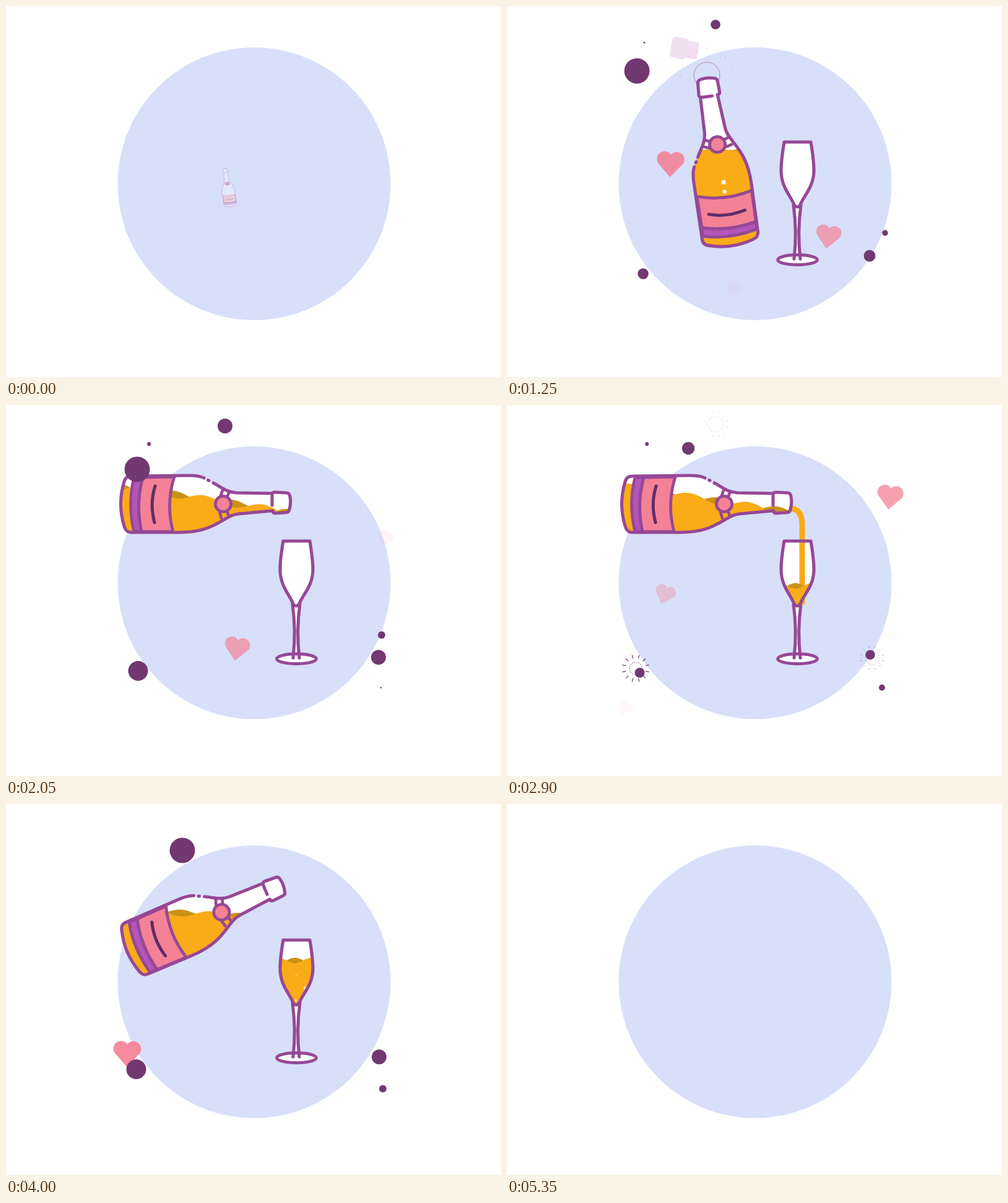
Recreate the animation shown at these times as an HTML page with a canvas. Size 800 px wide and 600 px high, loop 5.4 s.

```html
<!DOCTYPE html>
<html lang="en">
<head>
<meta charset="utf-8">
<title>Pouring champagne</title>
<style>
html, body { margin: 0; width: 100%; height: 100%; overflow: hidden; background: #fff; }
canvas { display: block; }
</style>
</head>
<body>
<canvas width="800" height="600"></canvas>
<script>
const ctx = document.querySelector('canvas').getContext('2d');
const LOOP = 5400, BOTTLE_WAVE = 675, GLASS_WAVE = 1080, TAU = Math.PI * 2;
const LINE = '#964896', PLUM = '#723871', PINK = '#f48296', GOLD = '#f9ab18',
      AMBER = '#ca9118', VIOLET = '#b455b9', INK = '#5f2d69';

const clamp = u => Math.min(1, Math.max(0, u));
const lerp = (a, b, u) => a + (b - a) * u;
const span = (t, from, to) => clamp((t - from) / (to - from));
const inOut = u => u < .5 ? 4 * u ** 3 : 1 - 4 * (1 - u) ** 3;
const smooth = u => u * u * (3 - 2 * u);
const backOut = u => 1 + 2.7 * (u - 1) ** 3 + 1.7 * (u - 1) ** 2;

// The bottle is described lying on its side, neck to the right.
const bottle = new Path2D('M203 206C196 206 193 203 191 196Q180 160 191 124Q193 115 203 115L296 114Q312 114 325 120C340 127 350 140 372 142L431 143Q431 141 434 141L453 142Q458 142 459 148Q461 158 458 169Q457 174 452 174L435 175Q431 175 431 171L376 176C352 178 340 206 280 206Z');
const bottleLine = new Path2D('M320 118Q312 114 296 114L203 115Q193 115 191 124Q180 160 191 196C193 203 196 206 203 206L280 206C340 206 352 178 376 176L431 171Q431 175 435 175L452 174Q457 174 458 169Q461 158 459 148Q458 142 453 142L434 141Q430 141 430 147L430 162M326.500 121.500L328 122.300M335 126C347 132 356 141 372 142L430 143');
const label = new Path2D('M272 116Q258 160 270 205L219 205Q209 160 221 117Z');
const band = new Path2D('M221 117Q209 160 219 205L207 205Q196 160 207 117Z');
const stripe = new Path2D('M241 131Q232 160 240 190');
const collar = new Path2D('M351 136Q340 160 348 183M361 140Q351 160 360 179');
const cup = new Path2D('M448 220L491 220C494 238 496 250 496 266C496 290 483 303 476 317Q473 325 469 325Q465 325 462 317C455 303 443 290 443 266C443 250 445 238 448 220Z');
const stem = new Path2D('M463 322Q469 365 464 409L474 409Q469 365 475 322Z');
const stemLine = new Path2D('M463 322Q469 365 464 409M474 409Q469 365 475 322');
const stream = new Path2D('M456 167Q477 167 477 194L477 322');
const heart = new Path2D('M0 .45L-.42 -.01A.26 .26 0 0 1 0 -.32A.26 .26 0 0 1 .42 -.01Z');

// radius, birth, pop, then the places it drifts through
const dots = [
  [20.5, 250, 2550, 210, 105, 212, 104, 224, 100],
  [12, 650, 2600, 337, 30, 354, 34, 337, 31],
  [3, 750, 3000, 222, 59, 231, 63, 226, 63],
  [16, 720, 2820, 220, 433, 213.5, 430, 208, 426],
  [12, 550, 2650, 586, 404, 602, 408, 590, 409],
  [6, 550, 2540, 611, 367, 607, 372, 619, 368],
  [20.5, 2400, 4980, 293, 70, 285, 75, 291, 71, 296, 71],
  [16, 2400, 5000, 214.5, 433, 210.5, 429, 203.5, 426.5, 222, 429],
  [12, 2300, 4360, 587, 404, 603, 409, 598, 409],
  [6, 1500, 4150, 606, 457, 609, 460.5, 616, 457]
];
// birth, x, y
const hearts = [
  [128, 257, 344], [390, 511, 441], [1190, 365, 462], [1950, 611, 224],
  [2455, 249, 342], [2830, 189, 496], [3210, 229, 257]
];

function disc(x, y, r, color) {
  ctx.fillStyle = color;
  ctx.beginPath();
  ctx.arc(x, y, Math.max(0, r), 0, TAU);
  ctx.fill();
}

function stroke(path, width = 5.1, color = LINE) {
  ctx.lineWidth = width;
  ctx.strokeStyle = color;
  ctx.stroke(path);
}

function fill(path, color) {
  ctx.fillStyle = color;
  ctx.fill(path);
}

function layer(draw) {
  ctx.save();
  draw();
  ctx.restore();
}

function zoom(x, y, s) {
  ctx.translate(x, y);
  ctx.scale(s, s);
  ctx.translate(-x, -y);
}

function liquid(left, right, surface) {
  for (const side of [-1, 1]) {
    ctx.fillStyle = side < 0 ? AMBER : GOLD;
    ctx.beginPath();
    ctx.moveTo(left, 600);
    for (let x = left; x <= right; x += 3) ctx.lineTo(x, surface(x, side));
    ctx.lineTo(right, 600);
    ctx.fill();
  }
}

function drawHeart(t, [birth, x, y]) {
  const u = (t - birth) / 1650;
  if (u <= 0 || u >= 1) return;
  layer(() => {
    const size = 26 + 24 * Math.sin(u * Math.PI / 2);
    ctx.globalAlpha = Math.min(.95, 1.3 * u, (1 - u) * 6.5);
    ctx.translate(x + 8 * Math.sin(u * 3), y - 130 * u);
    ctx.rotate((30 - 40 * u) * Math.PI / 180);
    ctx.scale(size, size);
    fill(heart, PINK);
  });
}

function burst(x, y, r, u) {
  layer(() => {
    ctx.translate(x, y);
    ctx.globalAlpha = clamp(1.9 * (1 - u));
    const dot = Math.max(.5, 1 - .5 * u), ray = lerp(.85, 1.85, u) * r;
    for (let i = 0; i < 18; i++) {
      const a = i / 18 * TAU, d = lerp(.5, 1.2, u) * r;
      disc(d * Math.cos(a), d * Math.sin(a), dot * .8, PLUM);
    }
    ctx.strokeStyle = PLUM;
    ctx.lineWidth = dot * 1.3;
    ctx.beginPath();
    for (let i = 0; i < 12; i++) {
      const a = (i + .5) / 12 * TAU, end = ray + .4 * r * Math.max(0, 1 - 1.4 * u) + .5;
      ctx.moveTo(ray * Math.cos(a), ray * Math.sin(a));
      ctx.lineTo(end * Math.cos(a), end * Math.sin(a));
    }
    ctx.stroke();
  });
}

function drawDot(t, [r, birth, pop, ...places]) {
  if (t < birth || t > pop + 400) return;
  const late = birth > 1400;
  const times = (late ? [2900, 4000, 4450] : [1250, 2050]).filter(k => k < pop).concat(pop);
  let i = 0;
  while (i < times.length - 2 && t > times[i + 1]) i++;
  const u = smooth(span(t, times[i], times[i + 1])), p = places.slice(2 * i);
  const x = lerp(p[0], p[2], u), y = lerp(p[1], p[3], u);
  if (t > pop) return burst(x, y, r, (t - pop) / 400);
  const grow = birth === 1500 ? 1900 : 1000;
  disc(x, y, r * smooth(span(t, birth, birth + grow)), PLUM);
}

function drawCork(t) {
  const u = span(t, 1080, 1290);
  if (u === 1) return;
  layer(() => {
    ctx.globalAlpha *= span(t, 0, 150) * (1 - u);
    ctx.translate(lerp(322, 279, u), lerp(110, 60, u));
    ctx.rotate(lerp(-8, -97, u) * Math.PI / 180);
    ctx.fillStyle = VIOLET;
    ctx.beginPath();
    ctx.roundRect(-17, -22, 34, 26, 5);
    ctx.roundRect(-14, 2, 28, 20, 3);
    ctx.fill();
  });
  if (u > 0) layer(() => {
    ctx.globalAlpha = 1 - .4 * u;
    ctx.strokeStyle = LINE;
    ctx.lineWidth = 1.2 - .4 * u;
    ctx.beginPath();
    ctx.arc(323, 112, 8 + 16 * u, 0, TAU);
    ctx.stroke();
    for (let i = 0; i < 16; i++) {
      const a = i / 16 * TAU, d = 14 + 35 * u;
      disc(323 + d * Math.cos(a), 112 + d * Math.sin(a), .6, LINE);
    }
  });
}

function drawBottle(t) {
  const s = t < 4900 ? backOut(span(t, -25, 475)) : 1 - span(t, 4900, 5300) ** 2;
  if (s <= 0) return;
  const tilt = inOut(span(t, 1430, 1930)) - inOut(span(t, 3807, 4307));
  const cx = lerp(340, 351, tilt), cy = lerp(224, 160, tilt);
  layer(() => {
    ctx.globalAlpha = clamp(.25 + t / 120);
    zoom(363, 306, s);
    drawCork(t);
    const upright = ctx.getTransform();
    const pose = () => {
      ctx.translate(cx, cy);
      ctx.rotate((tilt - 1) * 97.7 * Math.PI / 180);
      ctx.translate(-351, -160);
    };
    pose();
    fill(bottle, '#fff');
    layer(() => {
      ctx.clip(bottle);
      ctx.setTransform(upright);
      const flat = tilt ** 4, amp = 1.5 + 4.5 * Math.sqrt(tilt);
      const hump = 320 - (t - 2050) / BOTTLE_WAVE * 95;
      layer(() => {
        ctx.globalAlpha *= span(t, 0, 100);
        liquid(150, 500, (x, side) => cy + 9 - 12 * flat + .155 * flat * (x - cx)
          - side * amp * Math.cos((x - hump) / 95 * TAU));
      });
      for (let i = 0; i < 3; i++) {
        const u = span(t, 700 + i * 130, 1420 + i * 130);
        if (u > 0 && u < 1) disc(350 + 2 * Math.sin(i * 2), 350 - 85 * u, (5.5 - 2 * i) * Math.sin(u * Math.PI), '#fff3d6');
      }
      pose();
      fill(label, PINK);
      fill(band, VIOLET);
      stroke(label, 4.8);
      stroke(band, 4.8);
      stroke(collar, 4.8);
    });
    stroke(stripe, 5, INK);
    stroke(bottleLine);
    disc(351, 160, 15, LINE);
    disc(351, 160, 10.3, PINK);
  });
}

function drawGlass(t) {
  const s = t < 4600 ? backOut(span(t, 120, 620)) : 1 - span(t, 4600, 5000) ** 2;
  if (s <= 0) return;
  layer(() => {
    zoom(469, 322, s);
    fill(cup, '#fff');
    fill(stem, '#fff');
    ctx.beginPath();
    ctx.ellipse(469.5, 410.5, 32, 8, 0, 0, TAU);
    ctx.fillStyle = '#fff';
    ctx.fill();
    ctx.lineWidth = 4.8;
    ctx.strokeStyle = LINE;
    ctx.stroke();
    stroke(stemLine);

    const head = 164 * span(t, 2200, 2450), tail = 164 * span(t, 3430, 3650);
    if (head > tail) {
      ctx.setLineDash([head - tail, 400]);
      ctx.lineDashOffset = -tail;
      stroke(stream, 9, GOLD);
      ctx.setLineDash([]);
    }
    if (t > 2350) layer(() => {
      ctx.clip(cup);
      const level = lerp(326, 253, span(t, 2350, 3550));
      const hump = 467 + ((t - 4000) / GLASS_WAVE + .5) * 54;
      liquid(435, 504, (x, side) => level - side * 4.5 * Math.cos((x - hump) / 54 * TAU));
      if (t > 3300) [0, -4, 24].forEach((drift, i) => {
        const u = (t / GLASS_WAVE + i / 3) % 1;
        ctx.globalAlpha = clamp((.8 - u) * 4) * .9;
        disc(469 + drift * Math.sqrt(u), 320 - 60 * u, i === 2 ? 2.5 : 1.7, '#fff');
      });
    });
    stroke(cup);
  });
}

function draw(t) {
  ctx.fillStyle = '#fff';
  ctx.fillRect(0, 0, 800, 600);
  ctx.lineCap = ctx.lineJoin = 'round';
  disc(401, 287.5, 220.5, '#d8dff9');
  hearts.forEach(h => drawHeart(t, h));
  drawGlass(t);
  drawBottle(t);
  dots.forEach(d => drawDot(t, d));
}

const start = performance.now();
function tick() {
  draw((performance.now() - start) % LOOP);
  requestAnimationFrame(tick);
}
tick();
</script>
</body>
</html>
```
